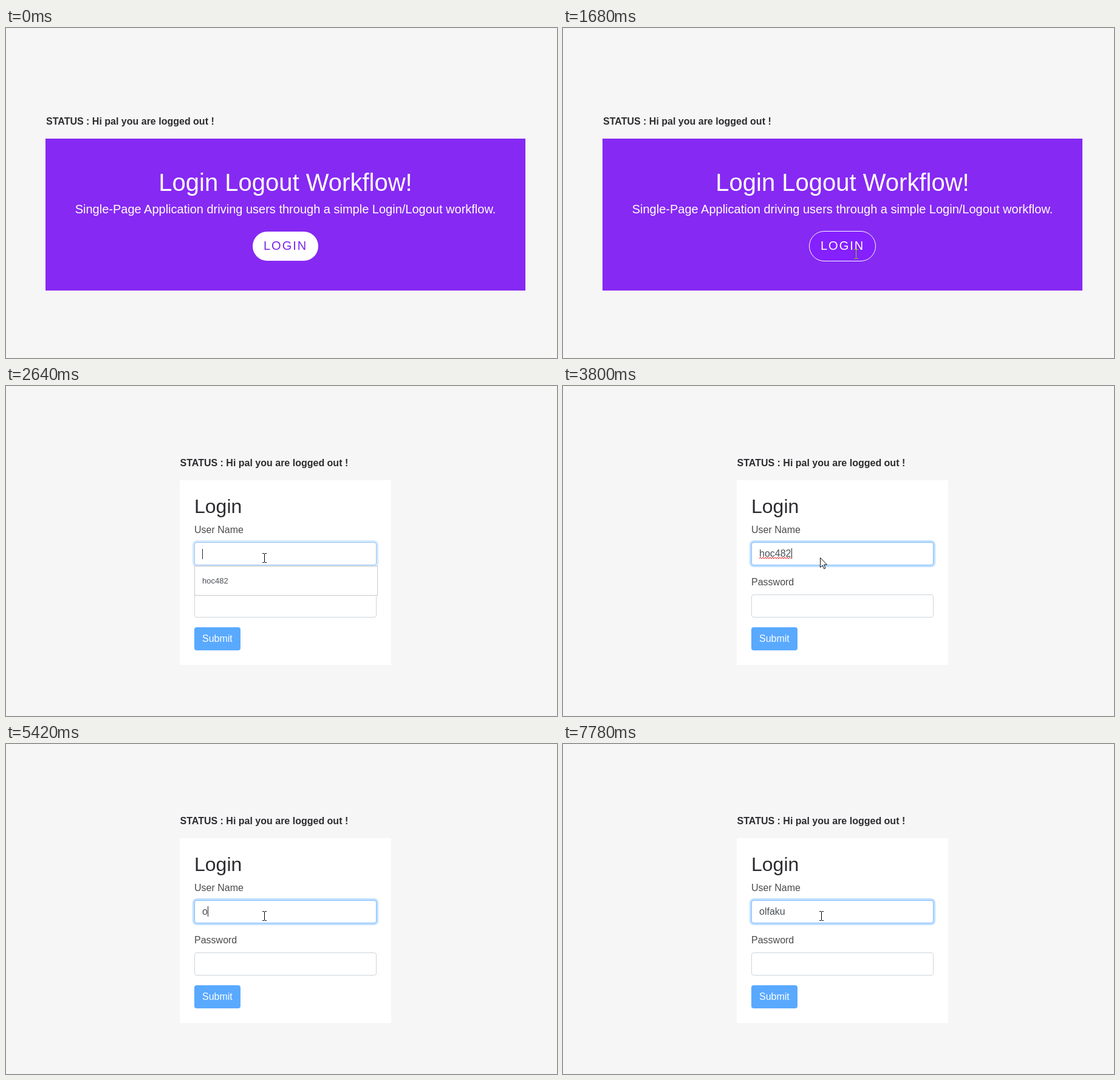
Animation of 907x543 px, one loop 8 s. Source, as an HTML page:

```html
<!DOCTYPE html>
<html lang="en">
<head>
<meta charset="utf-8">
<title>Login workflow</title>
<style>
  html, body { margin: 0; width: 100%; height: 100%; overflow: hidden; background: #f6f6f6; }
  svg { display: block; font: 16px "Liberation Sans", Arial, sans-serif; }
  text { white-space: pre; }
  .status { font-weight: bold; fill: #2c2c30; }
  .label { fill: #4a4a4d; }
  .value { fill: #495057; }
  .field { fill: #fff; stroke: #ced4da; }
  .center { text-anchor: middle; fill: #fff; }
  .button { font-size: 20px; letter-spacing: 2px; }
  #ibeam { fill: none; stroke: #fff; mix-blend-mode: difference; }
</style>
</head>
<body>
<svg width="907" height="543" viewBox="0 0 907 543">
  <rect width="907" height="543" fill="#f6f6f6"/>

  <g id="home">
    <text class="status" x="66" y="159">STATUS : Hi pal you are logged out !</text>
    <rect x="65" y="182" width="790" height="250" fill="#8629f3"/>
    <text class="center" x="460" y="268" font-size="40">Login Logout Workflow!</text>
    <text class="center" x="460" y="305" font-size="20">Single-Page Application driving users through a simple Login/Logout workflow.</text>
    <g class="button">
      <rect x="406" y="335" width="108" height="48" rx="24" fill="#fff"/>
      <text x="424" y="365" fill="#7a22ee">LOGIN</text>
      <g id="hover">
        <rect x="405.5" y="334.5" width="109" height="49" rx="24.5" fill="#8520ff" stroke="#fff"/>
        <text x="424" y="365" fill="#fff">LOGIN</text>
      </g>
    </g>
  </g>

  <g id="form">
    <rect id="panel" x="286" width="348" fill="#fff"/>
    <g id="upper">
      <text class="status" x="286.5" y="132">STATUS : Hi pal you are logged out !</text>
      <text x="310" y="209" font-size="32" fill="#2c2c30">Login</text>
      <text class="label" x="310" y="242">User Name</text>
      <rect class="field" x="310.5" y="257.5" width="299" height="37" rx="3.5"/>
      <g id="focus">
        <rect x="307" y="254" width="306" height="44" rx="7" fill="#bfdeff"/>
        <rect x="310.5" y="257.5" width="299" height="37" rx="3.5" fill="#fff" stroke="#80bdff"/>
      </g>
      <text id="value" class="value" x="323" y="281"></text>
      <path id="squiggle" fill="none" stroke="#f00"/>
      <rect id="caret" width="1" height="17" fill="#222"/>
      <g id="alert">
        <rect x="310.5" y="295.5" width="299" height="49" rx="3.5" fill="#f8d7da" stroke="#f5c6cb"/>
        <text x="331" y="325" fill="#5b2329">UserName is required.</text>
      </g>
    </g>
    <g id="lower">
      <text class="label" x="310" y="328">Password</text>
      <rect class="field" x="310.5" y="343.5" width="299" height="37" rx="3.5"/>
      <rect x="310" y="397" width="76" height="38" rx="4" fill="#59a9ff"/>
      <text x="323" y="421" fill="#fff">Submit</text>
    </g>
    <g id="popup">
      <rect id="option" x="310.5" y="296.5" width="301" height="48" stroke="#c8c8c8"/>
      <text class="value" x="323" y="325" font-size="13">hoc482</text>
    </g>
  </g>

  <path id="arrow" d="M.5 .5V16.5L4.2 13 6.7 18.8 9 17.8 6.5 12H11.5Z" fill="#fff" stroke="#111"/>
  <path id="ibeam" d="M-3-7.5h3M1-7.5h3M-3 7.5h3M1 7.5h3M.5-7v14"/>
</svg>

<script>
const LOOP = 8000, TEXT_X = 323;
const $ = id => document.getElementById(id);
const show = (id, on) => $(id).style.display = on ? '' : 'none';
const within = (t, ...spans) => spans.some(([a, b]) => t >= a && t < b);
const clamp = v => Math.max(0, Math.min(1, v));

const name = 'olfakudona';
const typed = [
  [0, ''], [3350, 'hoc482'], [3850, ''],
  ...[[5420, 1], [5490, 2], [5780, 3], [5860, 4], [6090, 5], [6270, 7], [6480, 8], [6610, 9],
    [6960, 10], [7120, 9], [7450, 8], [7610, 7], [7780, 6]].map(([t, n]) => [t, name.slice(0, n)])
];

// start, end, steps, from, to
const moves = [
  [170, 370, 4, [582, 468], [474, 390]],
  [520, 820, 6, [474, 390], [482, 372]],
  [2040, 2370, 7, [482, 372], [425, 283]]
];

function pointer(t) {
  if (t >= 3400 && t < 5420) return [423, 282];
  const [start, end, steps, from, to] = moves.findLast(m => t >= m[0]) || moves[0];
  const p = clamp(Math.floor((t - start) / (end - start) * (steps - 1) + 1e-6) / (steps - 1));
  return from.map((v, i) => Math.round(v + (to[i] - v) * p));
}

function drawForm(t) {
  const error = within(t, [3850, 5420]), shift = error ? 25 : 0;
  $('panel').setAttribute('y', 155 - shift);
  $('panel').setAttribute('height', 304 + 2 * shift);
  $('upper').setAttribute('transform', `translate(0 ${-shift})`);
  $('lower').setAttribute('transform', `translate(0 ${shift})`);
  show('alert', error);
  $('focus').style.opacity = clamp((t - 2540) / 150);

  const value = typed.findLast(s => t >= s[0])[1];
  $('value').textContent = value;
  const width = value ? $('value').getComputedTextLength() : 0;

  show('caret', within(t, [2540, 3050], [3350, 3850], [4400, 4930], [5420, 7450]));
  $('caret').setAttribute('x', Math.round(TEXT_X + width));
  $('caret').setAttribute('y', value ? 267 : 268);

  const waves = 'l2-2l2 2'.repeat(Math.round(width / 4));
  $('squiggle').setAttribute('d', `M${TEXT_X} 284${waves}`);
  show('squiggle', within(t, [3800, 3850], [7040, 7120]));

  show('popup', within(t, [2640, 3400]));
  $('option').setAttribute('fill', t >= 3350 ? '#e8e8e8' : '#fff');
}

function draw(now) {
  const t = now % LOOP, home = t < 1800;
  show('home', home);
  show('form', !home);
  if (home) $('hover').style.opacity = clamp((t - 620) / 200);
  else drawForm(t);

  const [x, y] = pointer(t);
  const arrow = within(t, [170, 700], [3400, 5420]);
  show('arrow', arrow);
  show('ibeam', t >= 170 && !arrow);
  for (const id of ['arrow', 'ibeam']) $(id).setAttribute('transform', `translate(${x} ${y})`);
  requestAnimationFrame(() => draw(performance.now() - begin));
}

const begin = performance.now();
draw(0);
</script>
</body>
</html>
```
